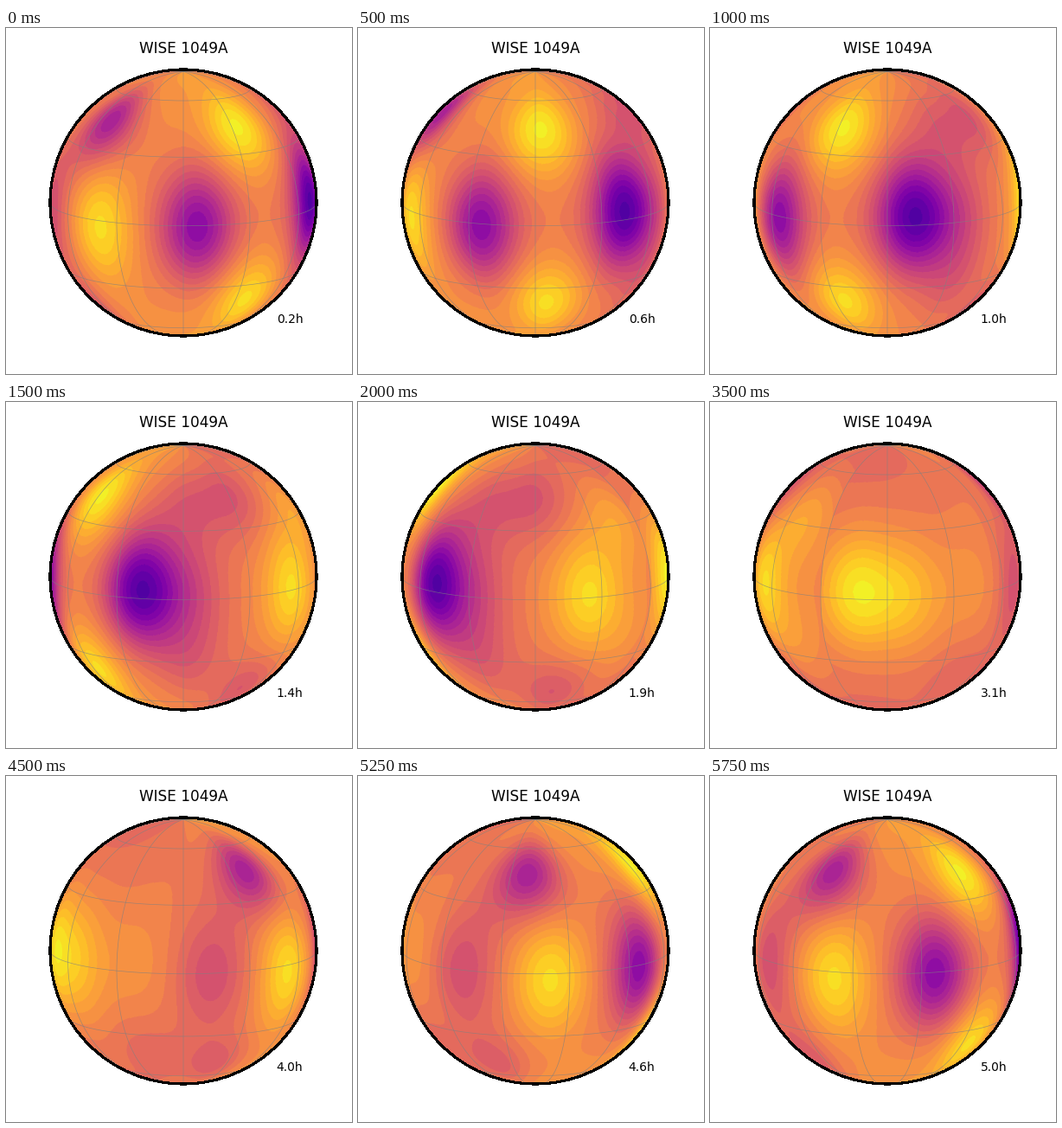
These frames come from a looping animation (400 by 400 pixels, 6 s). A matplotlib script:

```python
import numpy as np
import matplotlib.pyplot as plt
from matplotlib.animation import FuncAnimation
from matplotlib.patches import Circle

SIZE, DPI = 400, 100
FRAMES, INTERVAL = 24, 250
STEP = 360 / FRAMES
TILT = np.radians(10)
RADIUS = 154
PER_DEG = 4
BANDS = 25

# lon, lat and brightness of the main spots, by longitude
SPOTS = [
    (-164, 3.5, 0.965), (-142, 2, 0.89), (-110, 4, 0.74), (-108, -40, 0.61),
    (-78, -1, 0.53), (-70, -48, 0.57), (-67, 27, 0.58), (-49, 45, 0.37),
    (-38.7, -2.5, 0.93), (6, -0.5, 0.29), (33, 42, 0.97), (36, -37, 0.93),
    (70.6, 4, 0.15), (92, 4, 0.43), (90, 43, 0.55), (92, -28, 0.54),
    (118, 45, 0.54), (130, -48, 0.56), (143, 1.5, 0.93), (164, 33, 0.80),
    (164, -20, 0.77),
]


def background(lon, lat):
    """Even glow, with polar caps brighter on one side."""
    cap = np.sin(np.radians(lat)) ** 2
    return 0.69 + 0.08 * np.cos(np.radians(lon - 10)) * cap


def bells(lon, lat, lon0, lat0):
    """Spots grow wider and flatter away from the equator."""
    shrink = np.cos(np.radians(lat0))
    wide, tall = 11.5 / np.sqrt(shrink), 5 + 12.5 * shrink
    east = np.exp(-((lon[:, None] - lon0) / wide) ** 2 / 2)
    north = np.exp(-((lat[:, None] - lat0) / tall) ** 2 / 2)
    return east, north


def surface_colors():
    lon0, lat0, value = np.array(SPOTS).T
    # amplitudes that give every spot its brightness despite overlaps
    east, north = bells(lon0, lat0, lon0, lat0)
    amp = np.linalg.solve(east * north, value - background(lon0, lat0))
    lon = np.arange(-180, 180, 1 / PER_DEG)
    lat = np.arange(-90, 90 + 1 / PER_DEG, 1 / PER_DEG)
    east, north = bells(lon, lat, lon0, lat0)
    field = background(lon, lat[:, None]) + (north * amp) @ east.T
    level = (np.clip(np.floor(field * BANDS), 3, BANDS - 1) + 0.5) / BANDS
    return plt.cm.plasma(level)[..., :3]


def project(lon, lat):
    """Orthographic view; hidden points become NaN."""
    lon, lat = np.radians(lon), np.radians(lat)
    x = np.cos(lat) * np.sin(lon)
    depth = np.cos(lat) * np.cos(lon)
    y = np.sin(lat) * np.cos(TILT) - depth * np.sin(TILT)
    z = np.sin(lat) * np.sin(TILT) + depth * np.cos(TILT)
    hidden = z < 0
    return np.where(hidden, np.nan, x), np.where(hidden, np.nan, y)


COLORS = surface_colors()

# longitude and latitude under each (doubled) pixel of the disc
n = 4 * RADIUS
side = (np.arange(n) + 0.5) / n * 2 - 1
X, Y = np.meshgrid(side, -side)
r = np.maximum(np.hypot(X, Y), 1)
X, Y = X / r, Y / r
Z = np.sqrt(np.maximum(0, 1 - X**2 - Y**2))
LAT = np.degrees(np.arcsin(np.clip(Y * np.cos(TILT) + Z * np.sin(TILT), -1, 1)))
LON = np.degrees(np.arctan2(X, Z * np.cos(TILT) - Y * np.sin(TILT)))
ROW = np.rint((LAT + 90) * PER_DEG).astype(int)


def globe(centre):
    col = np.floor(((LON + centre + 180) % 360) * PER_DEG).astype(int)
    rgb = COLORS[ROW, col % (360 * PER_DEG)]
    return rgb.reshape(n // 2, 2, n // 2, 2, 3).mean(axis=(1, 3))


fig = plt.figure(figsize=(SIZE / DPI, SIZE / DPI), dpi=DPI, facecolor="white")
box = 2 * RADIUS / SIZE
ax = fig.add_axes([51 / SIZE, 44 / SIZE, box, box])
ax.set_axis_off()

image = ax.imshow(globe(0), extent=(-1, 1, -1, 1), interpolation="nearest")
image.set_clip_path(Circle((0, 0), 1, transform=ax.transData))
ax.add_patch(Circle((0, 0), 1, fill=False, ec="black", lw=1.5,
                    antialiased=False, clip_on=False, zorder=5))

grid = dict(color="gray", lw=0.5, alpha=0.7, snap=False)
around = np.linspace(-180, 180, 361)
upright = np.linspace(-90, 90, 181)
for lat in range(-60, 61, 30):
    ax.plot(*project(around, np.full_like(around, lat)), **grid)
meridians = [ax.plot([], [], **grid)[0] for _ in range(12)]
ax.set(xlim=(-1, 1), ylim=(-1, 1))

fig.text(205.5 / SIZE, 371 / SIZE, "WISE 1049A", fontsize=12.2, ha="center")
clock = ax.text(0.85, 0.05, "", fontsize=10, transform=ax.transAxes)


def update(i):
    centre = STEP * i
    image.set_data(globe(centre))
    for k, line in enumerate(meridians):
        line.set_data(*project(np.full_like(upright, 30 * k - centre), upright))
    clock.set_text(f"{(48 + 50 * i) / 240:.1f}h")
    return [image, clock, *meridians]


anim = FuncAnimation(fig, update, frames=FRAMES, interval=INTERVAL,
                     init_func=lambda: update(0), repeat=True, repeat_delay=0)
plt.show()
```
